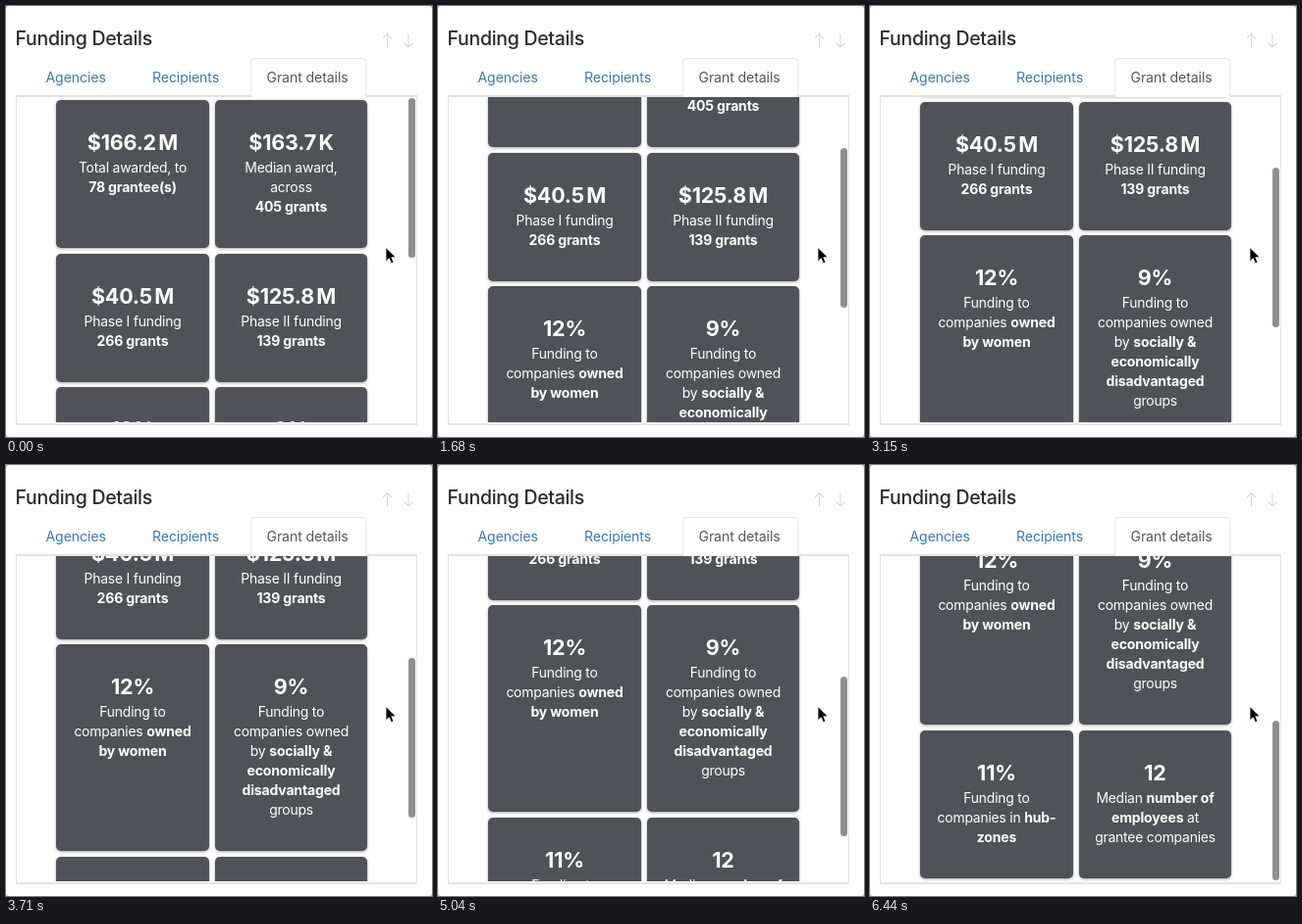
Recreate the animation shown at these times as an HTML page. Size 434 by 440 pixels, loop 7210 ms.

```html
<!DOCTYPE html>
<html lang="en">
<head>
<meta charset="utf-8">
<title>Funding Details</title>
<style>
  html, body { margin: 0; width: 100%; height: 100%; overflow: hidden; background: #c4c4c4; }
  svg { display: block; width: 434px; height: 440px; font-family: Inter, sans-serif; }
  .title { font-size: 19.5px; font-weight: 500; letter-spacing: -.3px; fill: #2a2b2e; }
  .tab { font-size: 14.1px; letter-spacing: -.1px; fill: #3d78b4; }
  .tab.active { fill: #555; }
  .line { fill: none; stroke: #e2e2e2; }
  .arrow { fill: none; stroke: #d9d9d9; stroke-width: 1.1; }
  .card rect { fill: #515257; filter: drop-shadow(0 1px 1.5px rgba(0, 0, 0, .35)); }
  .card text { fill: #fff; font-size: 13.9px; letter-spacing: -.2px; text-anchor: middle; }
  .card .amount { font-size: 21.5px; font-weight: 700; word-spacing: -2.5px; }
  .bold { font-size: 14px; font-weight: 700; letter-spacing: -.15px; }
</style>
</head>
<body>
<svg viewBox="0 0 434 440">
  <defs><clipPath id="view"><rect x="11" y="93" width="407" height="332"/></clipPath></defs>
  <rect width="434" height="440" rx="4" fill="#fff"/>
  <text class="title" x="9.5" y="40">Funding Details</text>
  <path class="arrow" d="M388.500 42V28.500M384 33l4.500-4.500 4.500 4.500M410 28.500V42M405.500 37.500l4.500 4.500 4.500-4.500"/>
  <rect class="line" x="10.500" y="92.500" width="408" height="334"/>
  <path class="line" d="M10 427.500H419M10 91.500H419"/>
  <g clip-path="url(#view)"><g id="content"></g></g>
  <path d="M249.500 93V57.500q0-4 4-4H363q4 0 4 4V93" fill="#fff" stroke="#e6e6e6"/>
  <text class="tab" x="40.500" y="78">Agencies</text>
  <text class="tab" x="149" y="78">Recipients</text>
  <text class="tab active" x="265.500" y="78">Grant details</text>
  <rect id="thumb" x="410" y="94" width="7" height="163" rx="3.500" fill="#8f8f8f"/>
  <path d="M387 246.500v14.200l3.300-3 2.200 5 2.500-1.100-2.200-4.900h4.500z" fill="#000" stroke="#fff" stroke-width=".8" stroke-linejoin="round"/>
</svg>
<script>
const FRAME = 70, LOOP = 7210;

// Each row: top, height, then two cards of amount and lines; *…* marks bold.
const rows = [
  [96, 151, ['$166.2 M', 'Total awarded, to', '*78 grantee(s)*'],
            ['$163.7 K', 'Median award,', 'across', '*405 grants*']],
  [253, 131, ['$40.5 M', 'Phase I funding', '*266 grants*'],
             ['$125.8 M', 'Phase II funding', '*139 grants*']],
  [389, 211, ['12%', 'Funding to', 'companies *owned*', '*by women*'],
             ['9%', 'Funding to', 'companies owned', 'by *socially &amp;*',
              '*economically*', '*disadvantaged*', 'groups']],
  [606, 151, ['11%', 'Funding to', 'companies in *hub-*', '*zones*'],
             ['12', 'Median *number of*', '*employees* at', 'grantee companies']],
];

const markBold = s => s.replace(/\*(.+?)\*/g, '<tspan class="bold">$1</tspan>');

function card(x, width, top, height, [amount, ...lines]) {
  const center = x + width / 2;
  const body = lines.map((line, i) =>
    `<text x="${center}" y="${top + 74 + i * 20}">${markBold(line)}</text>`).join('');
  return `<g class="card"><rect x="${x}" y="${top}" width="${width}" height="${height}" rx="5"/>
    <text class="amount" x="${center}" y="${top + 51}">${amount}</text>${body}</g>`;
}

const content = document.getElementById('content');
const thumb = document.getElementById('thumb');
content.innerHTML = rows.map(([top, height, left, right]) =>
  card(51, 156, top, height, left) + card(213, 155, top, height, right)).join('');

// Scroll gestures: [time in ms, scroll offset in px], eased in between.
const stops = [
  [0, 0], [980, 51], [1050, 51], [1680, 103], [2520, 103], [2730, 106],
  [3570, 204], [3710, 206], [4340, 206], [4410, 207], [4550, 207],
  [5040, 246], [5110, 246], [5460, 280], [5810, 280], [6440, 335], [LOOP, 335],
];

function scrollAt(time) {
  if (time <= 0) return 0;
  const i = stops.findIndex(([t]) => t >= time);
  const [t0, s0] = stops[i - 1], [t1, s1] = stops[i];
  const p = (time - t0) / (t1 - t0);
  return s0 + (s1 - s0) * p * p * (3 - 2 * p);
}

function draw(now) {
  const time = Math.floor((now % LOOP) / FRAME) * FRAME;
  content.setAttribute('transform', `translate(0 ${-Math.round(scrollAt(time))})`);
  // The scrollbar trails the content by one step.
  thumb.setAttribute('y', 94 + Math.round(scrollAt(time - FRAME) / 2));
}

const start = performance.now();
function tick() {
  draw(performance.now() - start);
  requestAnimationFrame(tick);
}
tick();
</script>
</body>
</html>
```
